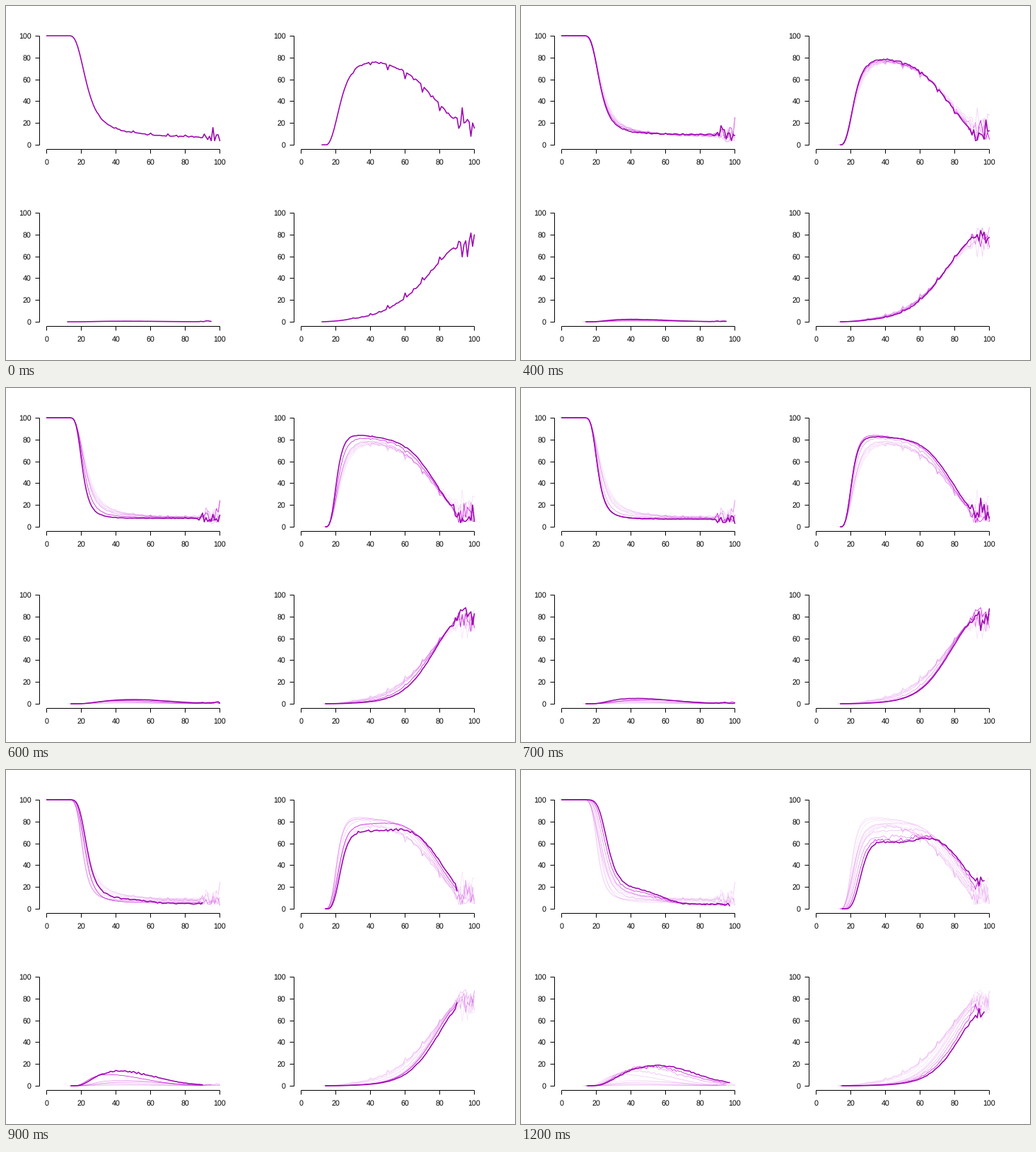
Animation, 720 px wide and 500 px high, one loop 1300 ms. Source, as a matplotlib script:

```python
import numpy as np
import matplotlib.pyplot as plt
from matplotlib.animation import FuncAnimation

W, H, DPI = 720, 500, 100
PX = 72 / DPI
COUNT = 13
NEW, OLD = "#9b00ae", "#c000d8"
PANELS = {"never": (0, 0), "married": (360, 0), "divorced": (0, 250), "widowed": (360, 250)}
AGES = np.arange(101)
LAST_AGE = [100] * 8 + [90, 90, 94, 95, 97]

# How the curve shapes drift from cohort to cohort
KEYS = [0, 2, 4, 6, 7, 8, 10, 12]
DRIFT = dict(
    wait=[10.4, 9.4, 9.3, 7.7, 7.9, 9.4, 11.6, 13.7],     # years from 13 to median marriage
    steep=[2.8, 2.8, 3.2, 3.8, 3.7, 3.9, 3.8, 4.5],
    single=[7, 8, 9.3, 7.7, 7, 5.6, 4, 4],                # share that never marries
    late=[2, 2, 0, 0, 0, 0, 7, 13],                       # share that marries late
    widow_age=[77.3, 76, 76, 77.5, 78.2, 78.8, 81.8, 85.2],
    widow_rate=[.074, .08, .088, .105, .105, .105, .105, .106],
    split=[.5, 1, 2.2, 3.8, 4.9, 10.2, 16.5, 18.6],       # height of the divorce peak
    split_age=[45, 45, 40, 50, 43, 35, 48, 56],
    rough=[.5, .5, .4, .2, .2, .1, .8, .35],
)


def logistic(x):
    return 1 / (1 + np.exp(-x))


def make_cohort(i):
    s = {name: np.interp(i, KEYS, row) for name, row in DRIFT.items()}
    rng = np.random.default_rng(11 + i)
    start = min(12 + i, 14) + (i > 9)
    since = np.maximum(AGES - 13, 0)
    adult = np.clip((AGES - 22) / 10, 0, 1)
    tail = np.clip((AGES - 86) / 8, 0, 1) * (1 if i < 8 else .4)

    def jitter(size):
        return size * s["rough"] * adult * rng.standard_normal(101)

    # Ages were reported in round numbers in the early cohorts
    heap = np.select([AGES % 10 == 0, AGES % 5 == 0], [1, .3], 0)
    heap = heap * max(0, 4 - .6 * i) * np.clip((AGES - 25) / 30, 0, 1.2) * (AGES < 85)

    floor = s["single"] + s["late"] * logistic((58 - AGES) / 5)
    never = floor + (100 - floor) / (1 + (since / s["wait"]) ** s["steep"])
    never = (never + .35 * heap + jitter(.6)) * np.exp(.45 * tail * rng.standard_normal(101))

    widowed = 100 * logistic(s["widow_rate"] * (np.minimum(AGES, 92) - s["widow_age"]))
    widowed *= np.clip((AGES - start) / 16, 0, 1)
    widowed += .9 * heap + jitter(.55) * np.clip(widowed / 12, 0, 1)

    peak = s["split_age"]
    rise = np.log(np.maximum(AGES - 14, .1) / (peak - 14)) / .65
    fall = (AGES - peak) / 21
    divorced = s["split"] * np.exp(-np.where(AGES < peak, rise, fall) ** 2 / 2)
    divorced += jitter(1) * np.clip(divorced / 15, 0, 1)
    divorced += .8 * tail * np.abs(rng.standard_normal(101))

    apart = 3.3 * np.exp(-((AGES - 42) / 22) ** 2)
    married = 100 - never - widowed - divorced - apart + jitter(.5)
    married = np.maximum(married + 7 * tail * rng.standard_normal(101), 5 * tail)
    widowed = np.where(tail > 0, 99 - never - married - divorced, widowed)

    out = dict(never=never, married=married, divorced=divorced, widowed=widowed)
    for name, y in out.items():
        hidden = AGES > (min(95, LAST_AGE[i]) if name == "divorced" and i < 5 else LAST_AGE[i])
        if name != "never":
            hidden |= AGES < start
        out[name] = np.where(hidden, np.nan, np.clip(y, 0, 100))
    return out


plt.rcParams["text.hinting"] = "none"
fig = plt.figure(figsize=(W / DPI, H / DPI), dpi=DPI, facecolor="white")
ax = fig.add_axes([0, 0, 1, 1])
ax.set(xlim=(0, W), ylim=(H, 0))
ax.axis("off")


def stroke(x, y):
    ax.plot(x, y, color="black", lw=PX, snap=True, solid_capstyle="butt")


def label(x, y, value, align):
    ax.text(x, y, str(value), ha=align, va="baseline", color="black",
            family="Liberation Sans", size=10.6 * PX)


def draw_axes(dx, dy):
    left, bottom = dx + 47, dy + 202.4
    stroke([dx + 57, dx + 302], [bottom] * 2)
    stroke([left] * 2, [dy + 42, dy + 196])
    for v in range(0, 101, 20):
        x, y = dx + 57 + 2.45 * v, dy + 196 - 1.54 * v
        stroke([x - .1] * 2, [bottom, bottom + 6])
        stroke([left - 6, left], [y, y])
        label(x + .5, dy + 223.8, v, "center")
        label(dx + 35.7, y + 3.8, v, "right")


for offset in PANELS.values():
    draw_axes(*offset)

lines = []
for data in map(make_cohort, range(COUNT)):
    lines.append([ax.plot(dx + 57.5 + 2.45 * AGES, dy + 196 - 1.54 * data[name],
                          solid_capstyle="round", solid_joinstyle="round")[0]
                  for name, (dx, dy) in PANELS.items()])


def update(k):
    for i, group in enumerate(lines):
        lag = k - i
        for line in group:
            line.set_visible(lag >= 0)
            if lag == 0:
                line.set(color=NEW, alpha=1, linewidth=1.55 * PX)
            elif lag > 0:
                line.set(color=OLD, alpha=max(.12, .9 / lag ** 1.1), linewidth=.75 * PX)
    return [line for group in lines for line in group]


anim = FuncAnimation(fig, update, frames=COUNT, interval=100,
                     repeat=True, repeat_delay=0, blit=False)
plt.show()
```
